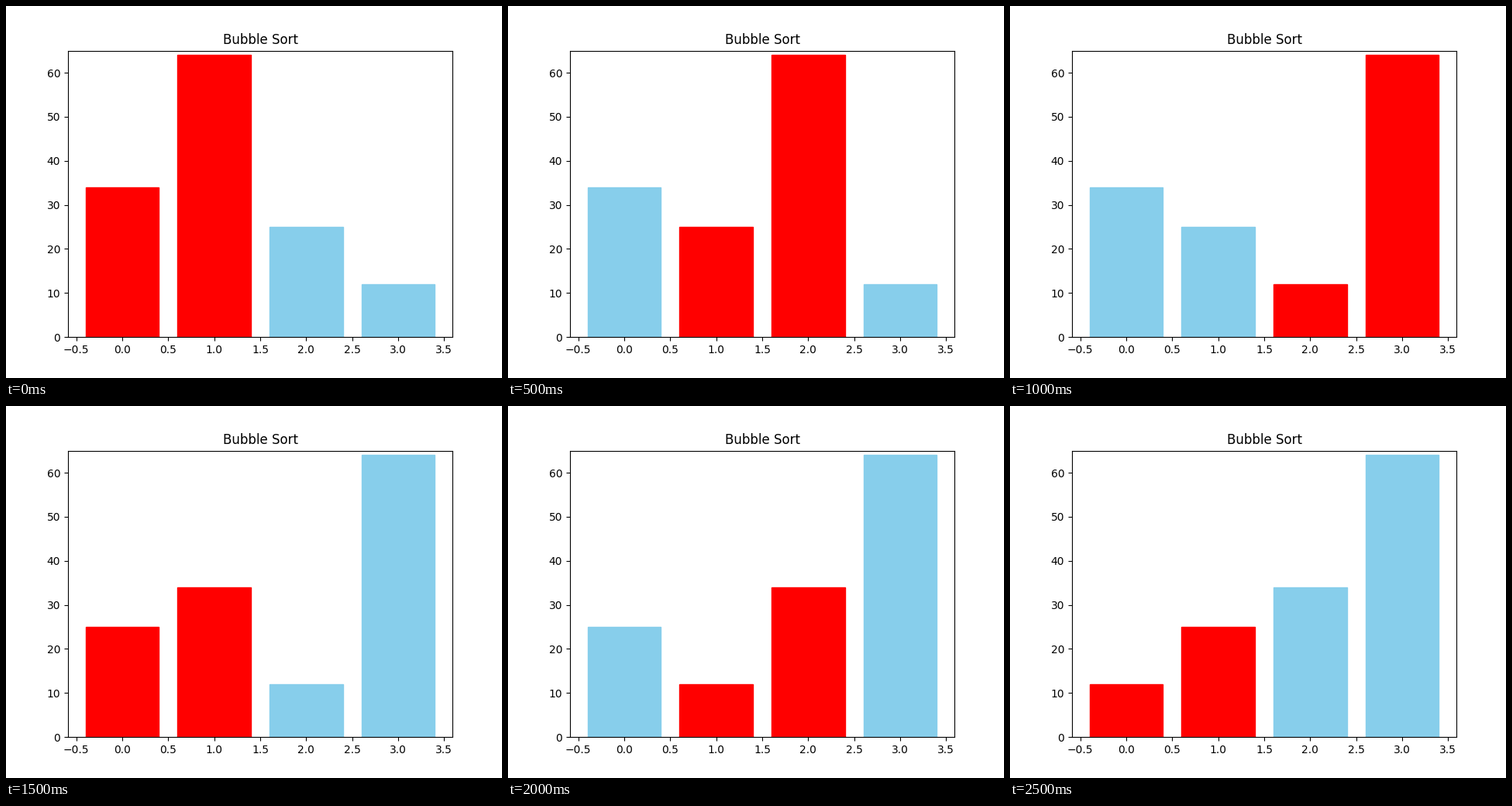
A matplotlib script that plays this animation: 640x480 px, repeating every 3 s.

```python
import matplotlib.pyplot as plt
from matplotlib.animation import FuncAnimation

VALUES = [64, 34, 25, 12]
STEP_MS = 500


def bubble_sort(values):
    """Yield the list and the left index of the pair after each comparison."""
    data = list(values)
    for end in range(len(data) - 1, 0, -1):
        for i in range(end):
            if data[i] > data[i + 1]:
                data[i], data[i + 1] = data[i + 1], data[i]
            yield list(data), i


steps = list(bubble_sort(VALUES))

fig, ax = plt.subplots(figsize=(6.4, 4.8), dpi=100)
ax.set_title("Bubble Sort")
bars = ax.bar(range(len(VALUES)), VALUES, color="skyblue")
ax.set_ylim(0, max(VALUES) + 1)


def update(step):
    data, left = steps[step]
    for i, (bar, height) in enumerate(zip(bars, data)):
        bar.set_height(height)
        bar.set_color("red" if i in (left, left + 1) else "skyblue")
    return bars


anim = FuncAnimation(fig, update, frames=len(steps), interval=STEP_MS,
                     repeat=True, repeat_delay=0, blit=False)
plt.show()
```
